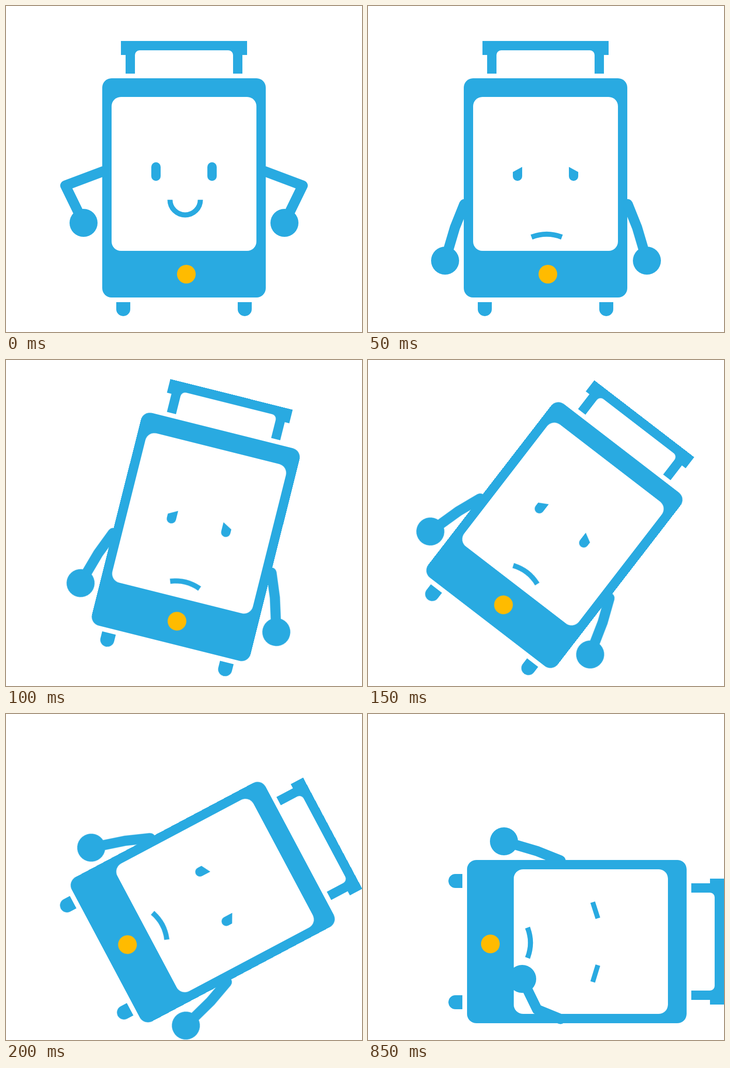
An HTML page that plays this animation: 762 px wide and 699 px high, repeating every 1250 ms.

```html
<!DOCTYPE html>
<html lang="en">
<head>
<meta charset="utf-8">
<title>Falling suitcase</title>
<style>
  html, body { margin: 0; width: 100%; height: 100%; overflow: hidden; background: #fff; }
  svg { display: block; width: 762px; height: 699px; }
  #suitcase, .pose { animation: 1250ms step-end infinite; }
  /* tips over around the yellow button */
  #suitcase { transform-origin: 385px 575px; animation-name: fall; }
  .happy { animation-name: happy; }
  .sad { animation-name: sad; }
  .falling { animation-name: falling; }
  .landed { animation-name: landed; }
  .blue { fill: #29aae1; }
  .line { fill: none; stroke: #29aae1; stroke-width: 11; }
  .arm { stroke-width: 21.8; stroke-linecap: round; stroke-linejoin: round; }

  @keyframes fall {
    0% { transform: translate(1px, 0) rotate(0deg); }
    4% { transform: translate(0, 0) rotate(0deg); }
    8% { transform: translate(-19px, -15px) rotate(14.07deg); }
    12% { transform: translate(-95px, -50px) rotate(37.63deg); }
    16% { transform: translate(-125px, -80.5px) rotate(62.03deg); }
    20%, 100% { transform: translate(-123px, -82px) rotate(90deg); }
  }
  @keyframes happy { 0% { opacity: 1; } 4%, 100% { opacity: 0; } }
  @keyframes sad { 0% { opacity: 0; } 4%, 100% { opacity: 1; } }
  @keyframes falling { 0% { opacity: 0; } 4% { opacity: 1; } 20%, 100% { opacity: 0; } }
  @keyframes landed { 0% { opacity: 0; } 20%, 100% { opacity: 1; } }
</style>
</head>
<body>
<svg viewBox="0 0 762 699">
  <defs>
    <g id="happyArm">
      <path class="line arm" d="M207 354.5L126 385L165 465"/>
      <circle class="blue" cx="165" cy="465" r="30"/>
    </g>
    <g id="sadArm">
      <path class="line arm" d="M206 425L186 475L165 546"/>
      <circle class="blue" cx="165" cy="546" r="30"/>
    </g>
    <path id="sadEye" class="blue" d="M310 356L330 345V365A10 10 0 0 1 310 365Z"/>
    <path id="wheel" class="blue" d="M235 635H265V650A15 15 0 0 1 235 650Z"/>
  </defs>

  <g id="suitcase">
    <path class="blue" d="M245 75H515V105H505V145H485V105A10 10 0 0 0 475 95H285A10 10 0 0 0 275 105V145H255V105H245Z"/>
    <rect class="blue" x="205" y="155" width="350" height="470" rx="20"/>
    <rect x="225" y="195" width="310" height="330" rx="20" fill="#fff"/>
    <use href="#wheel"/>
    <use href="#wheel" x="260"/>
    <circle cx="385" cy="575" r="20" fill="#fb0"/>

    <g class="pose happy">
      <use href="#happyArm"/>
      <use href="#happyArm" transform="translate(760) scale(-1 1)"/>
      <rect class="blue" x="310" y="335" width="20" height="40" rx="10"/>
      <rect class="blue" x="430" y="335" width="20" height="40" rx="10"/>
      <path class="line" d="M350 415.5A32.5 32.5 0 0 0 415 415.5"/>
    </g>

    <g class="pose sad">
      <use href="#sadArm"/>
      <path class="line" d="M350 495.5A91 91 0 0 1 415 495.5"/>
    </g>

    <g class="pose falling">
      <use href="#sadArm" transform="translate(762) scale(-1 1)"/>
      <use href="#sadEye"/>
      <use href="#sadEye" transform="translate(760) scale(-1 1)"/>
    </g>

    <g class="pose landed">
      <path class="line arm" d="M546 425L525.5 475L460 507"/>
      <circle class="blue" cx="460" cy="507" r="30"/>
      <path class="line" style="stroke-width:10.3" d="M295.5 356L330 345M430.5 345L466.5 356"/>
    </g>
  </g>
</svg>
</body>
</html>
```
